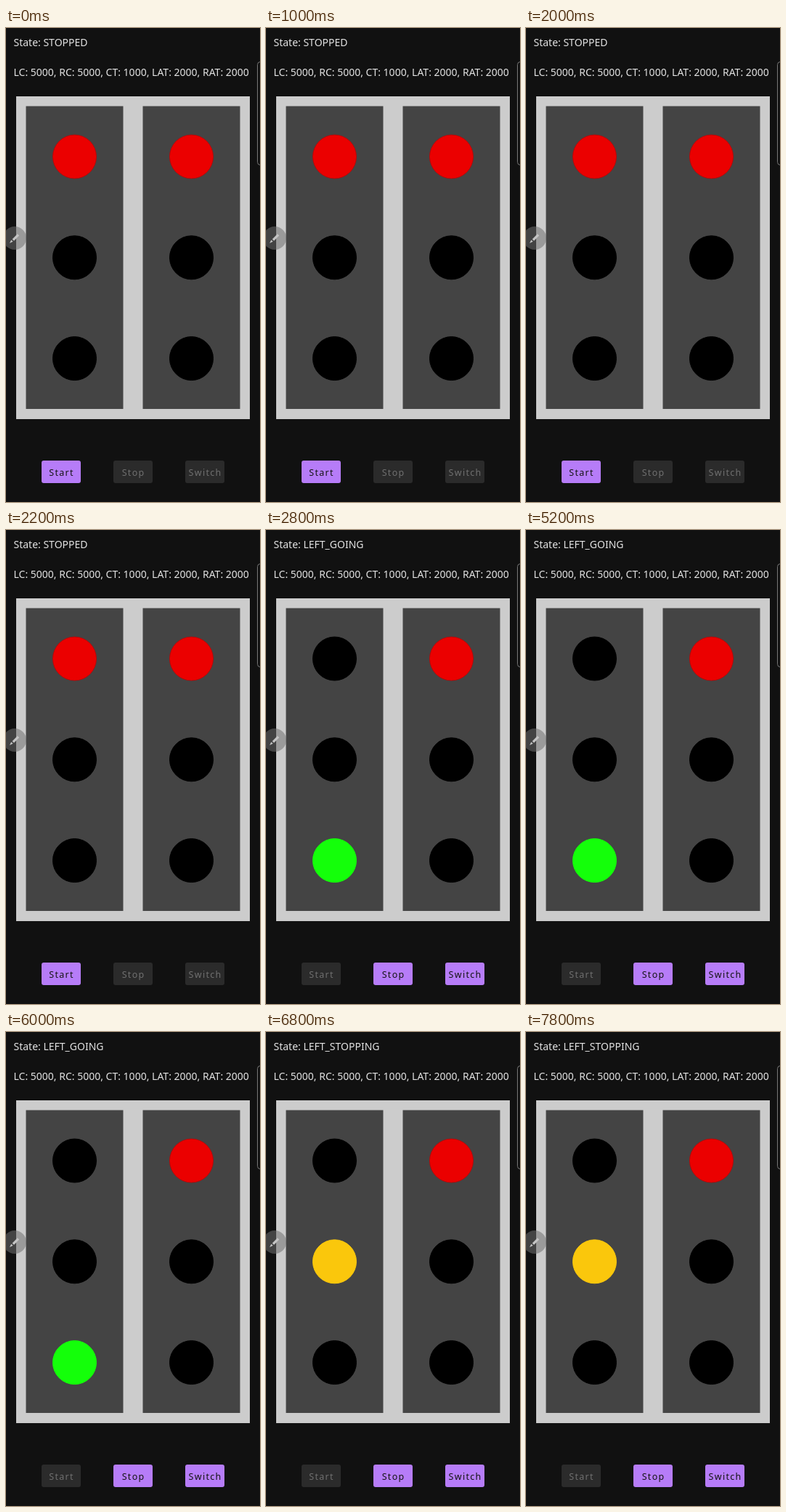
Animation, 350 px wide and 652 px high, one loop 8 s. Source, as an HTML page:

```html
<!DOCTYPE html>
<html lang="en">
<head>
<meta charset="utf-8">
<title>Traffic lights</title>
<style>
  html, body { margin: 0; height: 100%; overflow: hidden; background: #111; }
  svg { display: block; width: 100vw; height: 100vh; }
  text { font: 14px "Noto Sans", sans-serif; fill: #e2e2e2; }
  .button rect { fill: #2b2b2b; }
  .button text { font-size: 12.5px; letter-spacing: 1.3px; fill: #707070; }
  .button.on rect { fill: #b67cf8; }
  .button.on text { fill: #141414; }
</style>
</head>
<body>
<svg viewBox="0 0 350 652">
  <rect width="350" height="652" fill="#111"/>
  <text id="state" x="10.5" y="25"></text>
  <text x="10.5" y="66">LC: 5000, RC: 5000, CT: 1000, LAT: 2000, RAT: 2000</text>
  <rect x="346.5" y="46.5" width="12" height="142" rx="4" fill="#111" stroke="#777"/>
  <rect x="14" y="94" width="322" height="444" fill="#ccc"/>
  <g id="lights"></g>
  <circle cx="12" cy="289" r="16" fill="#6e6e6e" fill-opacity=".54"/>
  <path d="M5 296l2.2-4.6 2.4 2.4zM8.6 290.4l7.2-7.2 2.4 2.4-7.2 7.2z" fill="#c4c4c4"/>
  <g id="buttons"></g>
</svg>
<script>
const LOOP = 8000;
const COLORS = ['#eb0000', '#fac70c', '#14ff0a'];
const RED = 0, AMBER = 1, GREEN = 2;

const PHASES = [
  { from: 0, state: 'STOPPED', lit: [RED, RED], on: ['Start'] },
  { from: 2400, state: 'LEFT_GOING', lit: [GREEN, RED], on: ['Stop', 'Switch'] },
  { from: 6400, state: 'LEFT_STOPPING', lit: [AMBER, RED], on: ['Stop', 'Switch'] },
];

function add(parent, tag, attrs) {
  const el = document.createElementNS('http://www.w3.org/2000/svg', tag);
  for (const name in attrs) el.setAttribute(name, attrs[name]);
  return parent.appendChild(el);
}

const stateText = document.getElementById('state');
const lights = document.getElementById('lights');
const buttonRow = document.getElementById('buttons');

const lamps = [27.5, 188.5].map(x => {
  add(lights, 'rect', { x, y: 107.5, width: 134, height: 416.5, fill: '#444' });
  return COLORS.map((_, i) => add(lights, 'circle', {
    cx: x + 67, cy: 177 + i * 138.8, r: 30, 'stroke-width': 1,
  }));
});

const buttons = ['Start', 'Stop', 'Switch'].map((label, i) => {
  const group = add(buttonRow, 'g', { class: 'button' });
  const x = 49 + i * 99;
  add(group, 'rect', { x, y: 595, width: 54, height: 31, rx: 3 });
  add(group, 'text', { x: x + 27.6, y: 615.5, 'text-anchor': 'middle' }).textContent = label;
  return { label, group };
});

let current;

function show(phase) {
  stateText.textContent = 'State: ' + phase.state;
  lamps.forEach((column, side) => column.forEach((lamp, i) => {
    const lit = phase.lit[side] === i;
    lamp.setAttribute('fill', lit ? COLORS[i] : '#000');
    lamp.setAttribute('stroke', !lit ? '#000' : i === RED ? '#b80808' : COLORS[i]);
  }));
  for (const { label, group } of buttons) {
    group.classList.toggle('on', phase.on.includes(label));
  }
}

function frame() {
  const t = performance.now() % LOOP;
  const phase = PHASES.findLast(p => t >= p.from);
  if (phase !== current) show(current = phase);
  requestAnimationFrame(frame);
}
frame();
</script>
</body>
</html>
```
